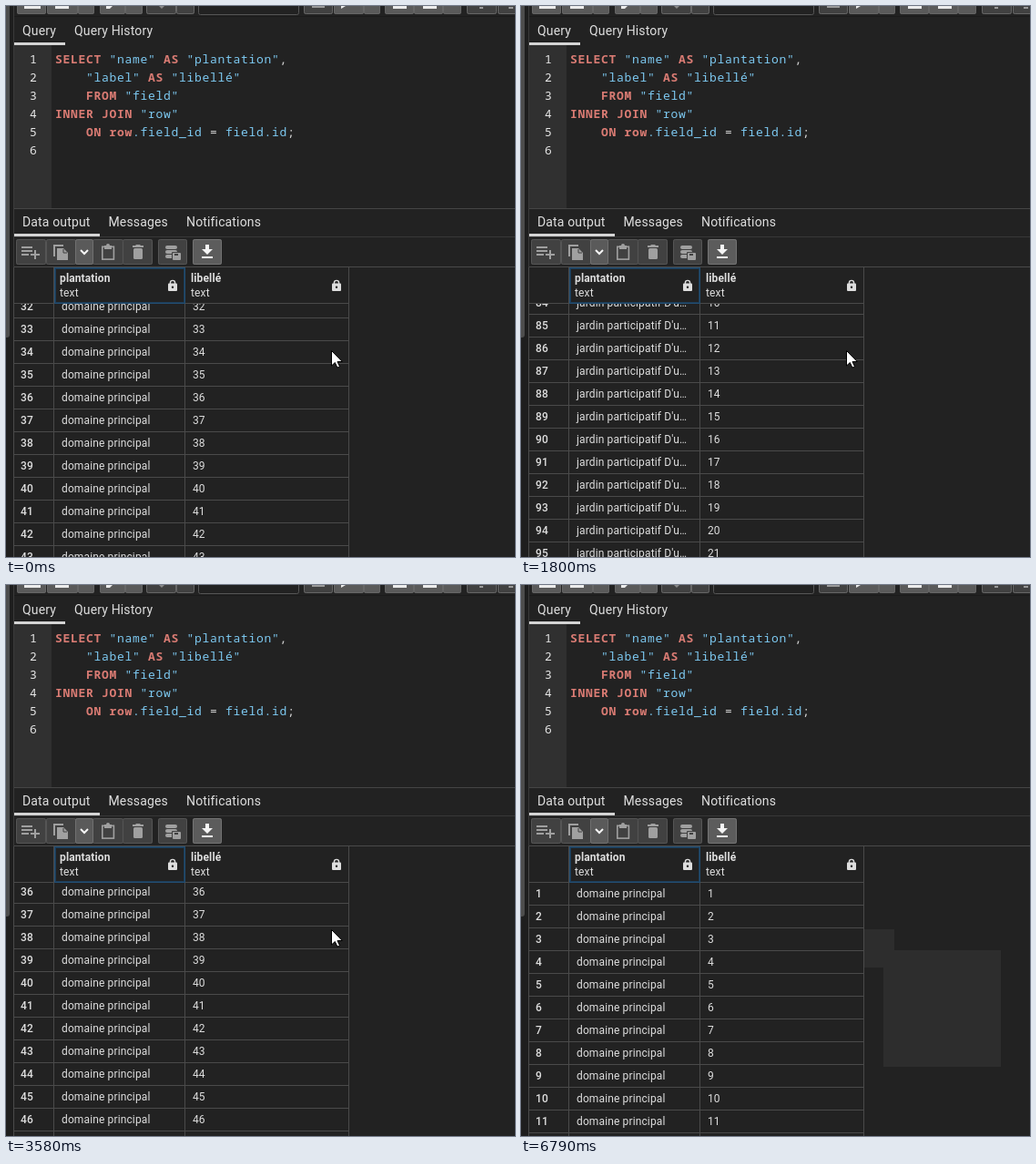
An HTML page with a canvas that plays this animation: 559x605 px, repeating every 6910 ms.

```html
<!DOCTYPE html>
<html lang="fr">
<head>
<meta charset="utf-8">
<title>Query grid</title>
<style>
html, body { margin: 0; width: 100%; height: 100%; overflow: hidden; background: #222; }
canvas { display: block; width: 559px; height: 605px; }
</style>
</head>
<body>
<canvas id="stage" width="559" height="605"></canvas>
<script>
const ctx = document.getElementById('stage').getContext('2d');
const LOOP = 6910;
const BG = '#222222', LINE = '#4a4a4a', TEXT = '#dedede';
const KEY = '#db7c74', NAME = '#7dc9f1', PLAIN = '#d4d4d4';
const SANS = 'Roboto, sans-serif', MONO = '"Noto Sans Mono", monospace';

// The picture only changes at these moments.
const ticks = [0, 120, 250, 370, 490, 780, 900, 1030, 1150, 1280, 1430, 1550,
  1680, 1800, 1930, 2050, 2770, 2890, 3030, 3180, 3300, 3450, 3580, 3700,
  3830, 3980, 4110, 4540, 4690, 4810, 6530, 6660, 6790];

// [time, scroll offset], linear between entries
const scrollKeys = [[0, 784], [490, 1200], [780, 1227], [1800, 2088], [2050, 2332],
  [2769, 2332], [2770, 2305], [3580, 877], [4110, 0], [LOOP, 0]];

// [time, x, y] of the pointer tip; no position means hidden
const pointerKeys = [[0, 357, 378], [4540, 398, 401], [4690, 515, 510], [4810],
  [6530, 525, 603], [6660, 532, 603], [6790]];

const fields = [
  { first: 1, name: 'domaine principal' },
  { first: 51, name: 'chez Solane' },
  { first: 75, name: "jardin participatif D'u…" },
  { first: 97, name: "extension D'ulmevan" }
];

const query = [
  [[KEY, 'SELECT'], [NAME, ' "name" '], [KEY, 'AS'], [NAME, ' "plantation"'], [PLAIN, ',']],
  [[NAME, '    "label" '], [KEY, 'AS'], [NAME, ' "libellé"']],
  [[KEY, '    FROM'], [NAME, ' "field"']],
  [[KEY, 'INNER JOIN'], [NAME, ' "row"']],
  [[KEY, '    ON row'], [NAME, '.field_id '], [PLAIN, '='], [NAME, ' field.id'], [PLAIN, ';']],
  []
];

const lastBefore = (list, t, at) => list.filter(item => at(item) <= t).pop();

function scrollAt(t) {
  const i = scrollKeys.findIndex(k => k[0] > t);
  const [t0, a] = scrollKeys[i - 1], [t1, b] = scrollKeys[i];
  return Math.round(a + (b - a) * (t - t0) / (t1 - t0));
}

function rect(x, y, w, h, color) {
  ctx.fillStyle = color;
  ctx.fillRect(x, y, w, h);
}

function frame(x, y, w, h, color) {
  ctx.strokeStyle = color;
  ctx.lineWidth = 1;
  ctx.strokeRect(x + .5, y + .5, w - 1, h - 1);
}

function text(str, x, y, size = 12, weight = 400, color = TEXT) {
  ctx.font = `${weight} ${size}px ${SANS}`;
  ctx.letterSpacing = size * .0107 + 'px';
  ctx.fillStyle = color;
  ctx.fillText(str, x, y);
}

function code(str, x, y, color) {
  ctx.font = `${color === KEY ? 700 : 400} 13px ${MONO}`;
  ctx.letterSpacing = '0.7px';
  ctx.fillStyle = color;
  ctx.fillText(str, x, y);
}

function path(points, color, width, close) {
  ctx.beginPath();
  points.forEach(([x, y]) => ctx.lineTo(x, y));
  if (close) ctx.closePath();
  if (width) {
    ctx.strokeStyle = color;
    ctx.lineWidth = width;
    ctx.stroke();
  } else {
    ctx.fillStyle = color;
    ctx.fill();
  }
}

function round(x, y, w, h, r, color) {
  ctx.beginPath();
  ctx.roundRect(x, y, w, h, r);
  ctx.fillStyle = color;
  ctx.fill();
}

function button(x, y, w, h, fill, edge) {
  round(x, y, w, h, 2, fill);
  ctx.strokeStyle = edge;
  ctx.lineWidth = 1;
  ctx.beginPath();
  ctx.roundRect(x + .5, y + .5, w - 1, h - 1, 2);
  ctx.stroke();
}

function topBar() {
  const on = '#5a5a5a', off = '#414141';
  const buttons = [[12, 32, on], [45, 34, on], [79, 18, on], [103, 28, on], [131, 19, on],
    [154, 33, off], [187, 20, off], [327, 32, off], [360, 33, on], [393, 18, on],
    [416, 32, on], [448, 32, on], [480, 20, on], [506, 33, off], [540, 25, off]];
  for (const [x, w, fill] of buttons) button(x, -20, w, 29, fill, '#666');
  button(211, -20, 111, 30, BG, '#555');
  for (const [x, w] of [[20, 18], [54, 15], [425, 15], [458, 15]]) rect(x, 0, w, 3, '#ececec');
  rect(336, 0, 14, 2, '#999');
  path([[110, 3], [114, 3], [117, 0], [110, 0]], '#ececec', 0, true);
  path([[368, 3], [373, 0], [368, 0]], '#ececec', 0, true);
  path([[168, 0], [171, 3], [174, 0]], '#888', 0, true);
  path([[520, 2], [524, 2]], '#999', 2);
  path([[552, 2], [557, 2]], '#999', 2);
}

function editor() {
  rect(9, 11, 550, 1, '#1b1b1b');
  text('Query', 18, 32, 14);
  text('Query History', 75, 32, 14);
  rect(9, 40, 56, 3, PLAIN);
  rect(9, 43, 41, 179, '#303030');
  query.forEach((parts, i) => {
    const y = 63 + i * 20;
    code(String(i + 1), 26, y, '#e6e6e6');
    let col = 0;
    for (const [color, str] of parts) {
      code(str, 54 + col * 8.5, y, color);
      col += str.length;
    }
  });
}

function icons() {
  const dim = '#a0a0a0', lit = '#f4f4f4';
  // add row
  rect(17, 264, 12, 2, dim);
  rect(17, 268, 12, 2, dim);
  rect(17, 272, 8, 2, dim);
  rect(27, 272, 10, 2, dim);
  rect(31, 268, 2, 10, dim);
  // copy
  path([[53, 275], [53, 263], [63, 263]], dim, 2);
  path([[56, 266], [63, 266], [68, 271], [68, 279], [56, 279]], dim, 0, true);
  path([[63, 267], [63, 271], [67, 271]], '#414141', 1);
  // chevron
  path([[82, 268], [86, 272], [90, 268]], lit, 2);
  // paste
  ctx.strokeStyle = dim;
  ctx.lineWidth = 1.6;
  ctx.strokeRect(105.8, 264.3, 12.6, 13.8);
  rect(108, 263, 8, 4, dim);
  round(110, 261, 4, 4, 2, dim);
  // bin
  rect(139, 263, 12, 2, dim);
  rect(142.5, 262, 5, 2, dim);
  round(140, 266, 10, 12, 1.5, dim);
  // stacked data
  for (const y of [263, 268, 273]) round(175, y, 13, 4, 2, dim);
  round(182, 270, 10, 9, 1, '#414141');
  round(183, 271, 9, 8, 1, dim);
  rect(185, 272, 4, 2, '#414141');
  // download
  rect(219, 262, 4, 6, lit);
  path([[215, 267], [227, 267], [221, 273]], lit, 0, true);
  rect(215, 275, 12, 2, lit);
}

function outputBar() {
  rect(9, 222, 550, 1, '#454545');
  text('Data output', 18, 242, 14);
  text('Messages', 112.5, 242, 14);
  text('Notifications', 198, 242, 14);
  rect(9, 250, 94, 3, PLAIN);
  rect(9, 253, 550, 1, '#383838');
  for (const [x, w] of [[11, 33], [44, 33], [95, 34], [128, 33], [167, 32]])
    button(x, 256, w, 28, '#414141', '#555');
  button(76, 256, 20, 28, '#5a5a5a', '#707070');
  button(205, 256, 32, 28, '#5c5c5c', '#747474');
  icons();
  rect(9, 286, 550, 1, LINE);
}

function lock(x) {
  ctx.beginPath();
  ctx.arc(x, 304, 2.6, Math.PI, 0);
  ctx.lineTo(x + 2.6, 306);
  ctx.moveTo(x - 2.6, 304);
  ctx.lineTo(x - 2.6, 306);
  ctx.strokeStyle = TEXT;
  ctx.lineWidth = 1.4;
  ctx.stroke();
  round(x - 5, 304.5, 10, 8.5, 1, TEXT);
  round(x - 1.2, 307.5, 2.4, 2.4, 1.2, BG);
}

function grid(scroll) {
  ctx.save();
  ctx.beginPath();
  ctx.rect(8, 327, 369, 278);
  ctx.clip();
  const first = Math.floor(scroll / 25) + 1;
  for (let n = first; n < first + 13; n++) {
    const y = 327 + (n - 1) * 25 - scroll;
    const field = lastBefore(fields, n, f => f.first);
    text(String(n), 16, y + 16, 12, 500);
    text(field.name, 61, y + 16);
    text(String(n - field.first + 1), 205, y + 16);
    rect(9, y + 24, 368, 1, LINE);
  }
  ctx.restore();
  rect(9, 326, 368, 1, LINE);
  for (const x of [8, 52, 196, 376]) rect(x, 287, 1, 318, LINE);
  text('plantation', 59, 303, 12, 700);
  text('text', 59, 319);
  text('libellé', 203, 303, 12, 700);
  text('text', 203, 319);
  lock(183);
  lock(363);
  frame(53, 287, 144, 40, '#234e72');
  frame(54, 288, 142, 38, '#1d3d58');
}

function pointer(x, y) {
  const shape = [[0, 0], [0, 16.5], [3.8, 13], [6.4, 18.6], [9, 17.4], [6.5, 12], [11.8, 12]]
    .map(([dx, dy]) => [x + dx + .5, y + dy + .5]);
  path(shape, '#ffffff', 0, true);
  path(shape, '#000000', 1, true);
}

function draw(time) {
  const t = lastBefore(ticks, time, v => v);
  rect(0, 0, 559, 605, BG);
  rect(0, 0, 8, 605, '#1e1e1e');
  round(-4, -10, 8, 374, 3, '#4d4d4d');
  rect(8, 0, 1, 605, '#3a3a3a');
  topBar();
  editor();
  outputBar();
  grid(scrollAt(t));
  if (t >= 4540) rect(377, 378, 33, 42, '#2d2d2d');
  if (t >= 4690) rect(398, 401, 129, 128, '#2d2d2d');
  const [, x, y] = lastBefore(pointerKeys, t, k => k[0]);
  if (x !== undefined) pointer(x, y);
}

const start = performance.now();
function tick() {
  draw((performance.now() - start) % LOOP);
  requestAnimationFrame(tick);
}
tick();
</script>
</body>
</html>
```
